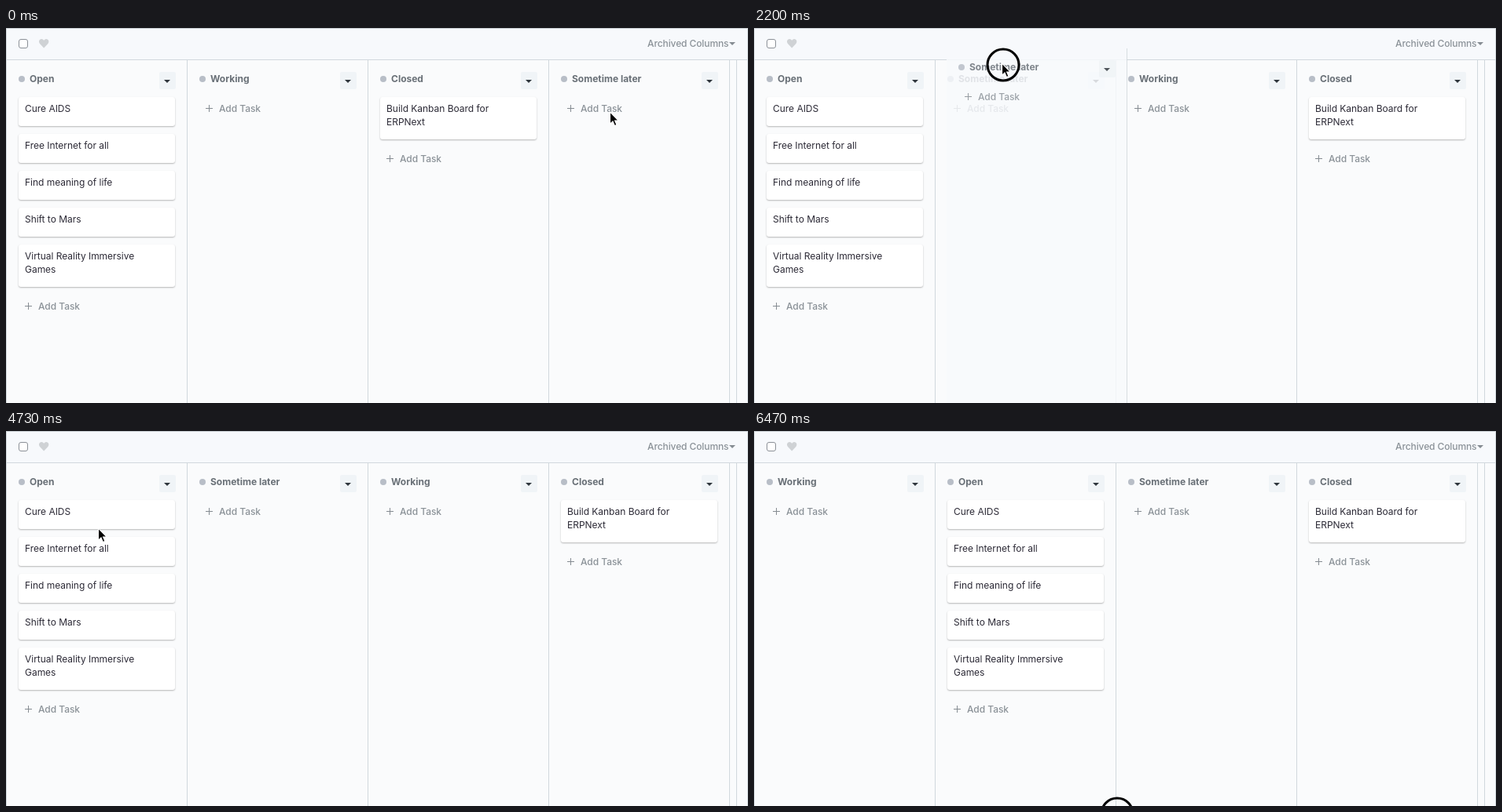
Write an HTML page that moves like this. It is 944 by 478 pixels and loops after 6540 ms.

```html
<!DOCTYPE html>
<html lang="en">
<head>
<meta charset="utf-8">
<title>Kanban board</title>
<style>
  html, body { margin: 0; width: 100%; height: 100%; overflow: hidden; background: #fafbfc; }
  #stage { position: relative; width: 944px; height: 478px; overflow: hidden; background: #fafbfc;
    font: 12px/17px Inter, "Noto Sans", sans-serif; color: #2c2a36; white-space: nowrap; }
  #stage * { position: absolute; box-sizing: border-box; }
  .bar { left: 0; top: 0; width: 944px; height: 41px; background: #f7f9fc; border-bottom: 1px solid #d1d8dd; }
  .edge { background: #d1d8dd; }
  .check { left: 16px; top: 14px; width: 12px; height: 12px; border: 1px solid #8b9097; border-radius: 3px; background: #fff; }
  .menu { left: 816px; top: 11px; font-weight: 500; letter-spacing: -.1px; color: #8b9298; }
  .col { left: 0; top: 41px; width: 230px; height: 500px; background: #fafbfc; border-right: 1px solid #d1d8dd; }
  .dot { left: 15px; top: 20px; width: 8px; height: 8px; border-radius: 50%; background: #b8bec7; }
  .title { left: 29px; top: 15px; font-weight: 700; color: #697077; }
  .btn { left: 194px; top: 15px; width: 21px; height: 22px; border-radius: 2px; background: #f0f4f7; }
  .btn.hover { background: #cfd9e0; }
  .tri { width: 0; height: 0; border: 4px solid transparent; border-bottom-width: 0; border-top-color: #2f363d; }
  .btn .tri { left: 6px; top: 10px; }
  .card { left: 15px; width: 199px; border-radius: 3px; background: #fff; padding: 6px 8px;
    letter-spacing: -.03px; white-space: pre; box-shadow: 0 1px 2px rgba(0, 0, 0, .28); }
  .add { left: 40px; font-weight: 500; letter-spacing: -.05px; color: #8b9298; }
  .add::before, .add::after { content: ""; position: absolute; background: #858c92; }
  .add::before { left: -17px; top: 8px; width: 9px; height: 1px; }
  .add::after { left: -13px; top: 4px; width: 1px; height: 9px; }
  .lifted { background: #f8fafd; opacity: .84; }
  svg { left: 0; top: 0; overflow: visible; }
</style>
</head>
<body>
<div id="stage">
  <div class="bar">
    <div class="check"></div>
    <svg width="60" height="40"><path fill="#cfd2d5" d="M48.2 25.5 L43 20 C40.6 16.8 43 14 45.2 14 C46.8 14 47.7 15 48.2 16 C48.7 15 49.6 14 51.2 14 C53.4 14 55.8 16.8 53.4 20 Z"/></svg>
    <div class="menu">Archived Columns</div>
    <div class="tri" style="left:920px;top:18px;border-top-color:#858c92"></div>
  </div>
</div>
<script>
const LOOP = 6540;
const STEP = 200 / 3;
const stage = document.getElementById('stage');

function add(parent, cls, text = '', style = {}) {
  const el = document.createElement('div');
  el.className = cls;
  el.textContent = text;
  Object.assign(el.style, style);
  parent.append(el);
  return el;
}

const edge = (left, top, width, height, background = '') =>
  add(stage, 'edge', '', { left: left + 'px', top: top + 'px', width: width + 'px', height: height + 'px', background });

const board = {
  open: ['Open', ['Cure AIDS', 'Free Internet for all', 'Find meaning of life', 'Shift to Mars',
    'Virtual Reality Immersive\nGames']],
  working: ['Working', []],
  closed: ['Closed', ['Build Kanban Board for\nERPNext']],
  later: ['Sometime later', []],
};

function makeColumn(key, cls = '') {
  const [title, cards] = board[key];
  const col = add(stage, 'col ' + cls);
  add(col, 'dot');
  add(col, 'title', title);
  add(add(col, 'btn'), 'tri');
  let y = 47;
  for (const text of cards) {
    const height = text.includes('\n') ? 54 : 37;
    add(col, 'card', text, { top: y + 'px', height: height + 'px' });
    y += height + 10;
  }
  add(col, 'add', 'Add Task', { top: (cards.length ? y + 6 : 53) + 'px' });
  return col;
}

const cols = {};
for (const key in board) cols[key] = makeColumn(key);

edge(929, 41, 1, 437);
edge(943, 0, 1, 478);
edge(0, 0, 1, 478);
edge(0, 0, 944, 1, '#c6cbd0');

// Slot of each column: start, then [time, new slot]
const slots = {
  open: [0, [5420, 1]],
  working: [1, [2040, 2], [5300, 1], [5420, 0]],
  closed: [2, [1820, 3]],
  later: [3, [1820, 2], [2040, 1], [5300, 2]],
};

// Pointer path: time, x, y
const path = [
  [0, 770, 109], [70, 770, 109], [670, 764, 72], [1270, 763, 62], [1420, 763, 62],
  [1607, 642, 68], [1667, 611, 68], [1870, 470, 58], [2070, 345, 49], [2140, 317, 47],
  [3340, 317, 47], [3870, 140, 108], [4130, 112, 130], [4400, 122, 122], [4700, 119, 126],
  [4800, 119, 126], [5070, 520, 66], [5170, 520, 66], [5330, 330, 64], [5470, 180, 67],
  [5600, 71, 68], [6140, 71, 68], [6450, 462, 488], [LOOP, 462, 488],
];

const drags = [
  { from: 1420, to: 3260, slot: 3, grab: [763, 62], el: makeColumn('later', 'lifted') },
  { from: 5170, to: 6060, slot: 2, grab: [520, 66], el: makeColumn('working', 'lifted') },
];
const presses = [[1380, 3260], [5120, 6060], [6400, LOOP]];
const LAG = 60, SHIFT = 150;

stage.insertAdjacentHTML('beforeend', `
  <svg id="pointer" width="1" height="1">
    <circle id="ring" r="20" fill="none" stroke="#000" stroke-width="3"/>
    <path id="arrow" d="M-1.5 -2 V13.2 L2 10 L4.4 15.6 L7 14.5 L4.6 9.1 H9.2 Z" fill="#000" stroke="#fff" stroke-width="1.1"/>
    <path id="beam" d="M-3 -6.5 Q0 -6.5 .5 -5 Q1 -6.5 4 -6.5 M.5 -5 V5 M-3 6.5 Q0 6.5 .5 5 Q1 6.5 4 6.5 M-1.5 2.5 H2.5" fill="none" stroke="#222" stroke-width="1.2"/>
  </svg>`);
const [pointer, ring, arrow, beam] = ['pointer', 'ring', 'arrow', 'beam'].map(id => document.getElementById(id));

const clamp = v => Math.max(0, Math.min(1, v));
const smooth = v => v * v * (3 - 2 * v);
const within = (t, a, b) => t >= a && t < b;
const show = (el, on) => { el.style.display = on ? '' : 'none'; };
const move = (el, x, y) => { el.style.transform = `translate(${x}px, ${y}px)`; };

function pointerAt(t) {
  const i = Math.max(1, path.findIndex(p => p[0] > t));
  const [ta, xa, ya] = path[i - 1], [tb, xb, yb] = path[i];
  const k = clamp((t - ta) / (tb - ta));
  return [xa + (xb - xa) * k, ya + (yb - ya) * k];
}

function slotAt([start, ...steps], t) {
  return steps.reduce((at, [time, next]) => at + (next - at) * smooth(clamp((t - time) / SHIFT)), start);
}

function draw(t) {
  for (const key in cols) move(cols[key], Math.round(1 + 230 * slotAt(slots[key], t)), 0);
  cols.later.querySelector('.btn').classList.toggle('hover', within(t, 5320, 6130));

  for (const d of drags) {
    const on = within(t, d.from, d.to);
    show(d.el, on);
    if (!on) continue;
    const [x, y] = pointerAt(t - LAG);
    move(d.el, Math.round(1 + 230 * d.slot + x - d.grab[0]), Math.round(y - d.grab[1]));
  }

  const [x, y] = pointerAt(t);
  const text = within(t, 3260, 3400);
  move(pointer, Math.round(x), Math.round(y));
  show(ring, presses.some(([a, b]) => within(t, a, b)));
  show(beam, text);
  show(arrow, !text);
}

const begin = performance.now();
function tick() {
  const t = (performance.now() - begin) % LOOP;
  draw(Math.floor((t + 4) / STEP) * STEP);
  requestAnimationFrame(tick);
}
tick();
</script>
</body>
</html>
```
